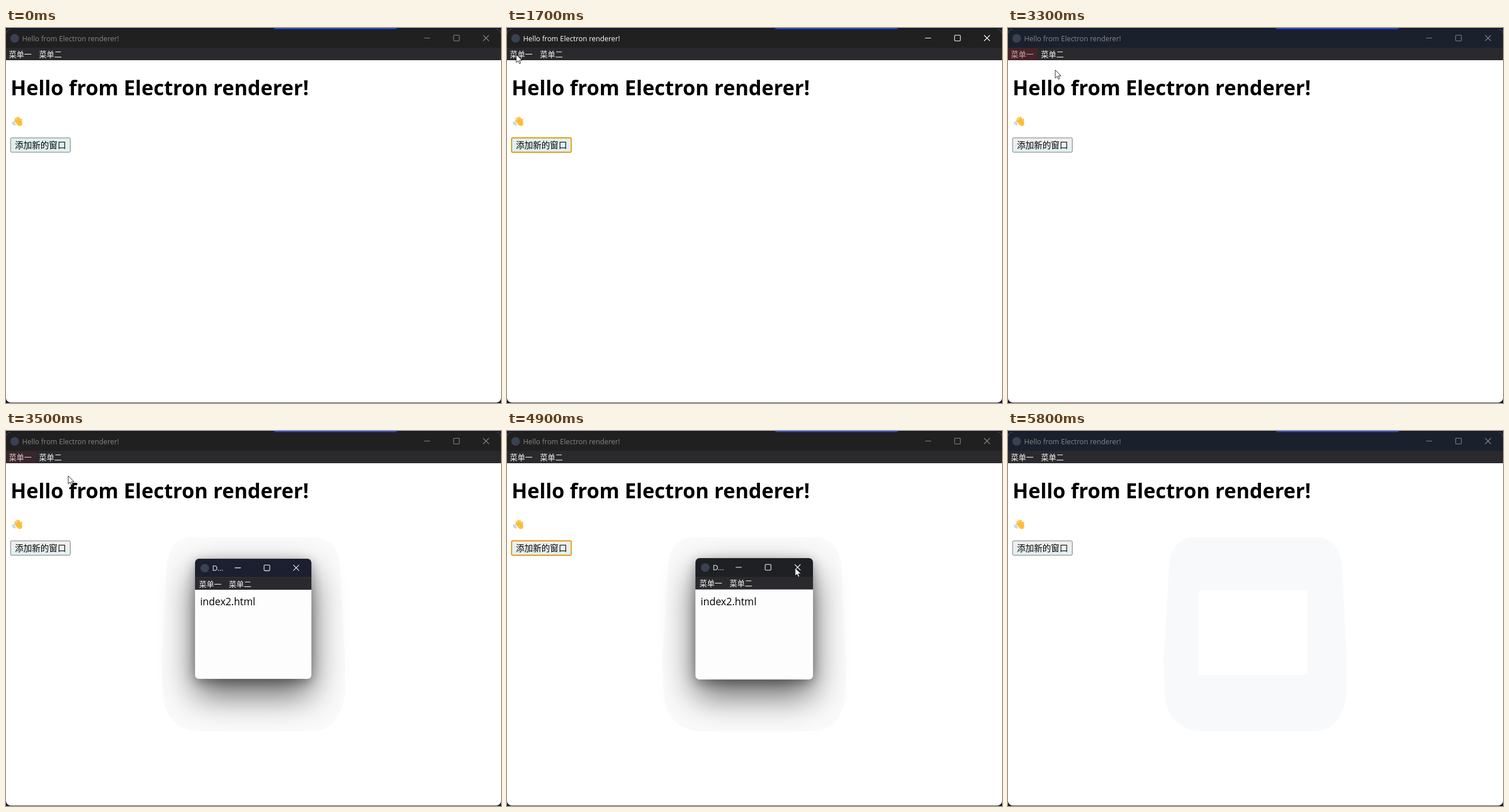
An HTML page that plays this animation: 859 px wide and 652 px high, repeating every 5.9 s.

```html
<!DOCTYPE html>
<html lang="zh-CN">
<head>
<meta charset="utf-8">
<title>Windows</title>
<style>
html, body { margin: 0; width: 100%; height: 100%; overflow: hidden; background: #0c1838; }
svg { display: block; width: 100vw; height: 100vh; }
text { font: 13.2px "Open Sans", "Noto Sans", "Noto Sans CJK SC", "Noto Sans CJK", sans-serif; white-space: pre; }
.bar { font-size: 12.35px; }
.heading { font-size: 35.5px; font-weight: 700; }
.button { font-size: 14.8px; }
.page { font-size: 17.5px; }
.light { fill: #f4f4f4; }
.controls { fill: none; stroke: currentColor; stroke-width: 1.1; }
</style>
</head>
<body>
<svg id="stage" viewBox="0 0 859 652"></svg>
<script>
const LOOP = 5900, STEP = 100;
const stage = document.getElementById('stage');

const label = (x, y, text, cls = 'light', more = '') =>
  `<text x="${x}" y="${y}" class="${cls}" ${more}>${text}</text>`;

const box = (x, y, w, h, fill, more = '') =>
  `<rect x="${x}" y="${y}" width="${w}" height="${h}" fill="${fill}" ${more}/>`;

const appIcon = (x, y) => `<circle cx="${x}" cy="${y}" r="7.5" fill="#3a4152"/>`;

// Minimize, maximize and close, with x at the middle of the first one
const controls = (x, y, gap = 51.25) => `<g class="controls">
  <path d="M${x - 5} ${y}h10.5"/>
  <rect x="${x + gap - 5}" y="${y - 5}" width="10" height="10" rx="1.5"/>
  <path d="M${x + 2 * gap - 5} ${y - 5}l10 10m0 -10l-10 10"/></g>`;

const menuTitles = (x, y) => label(x, y, '菜单一') + label(x + 52.3, y, '菜单二');

const wave = `<g fill="none" stroke="#fcc23c" stroke-linecap="round">
  <path stroke-width="2.6" d="M20.5 166L15 161.500M21 163.500L16 158M23 161.500L18.600 155.800M25 161L22 155.500"/>
  <ellipse cx="23" cy="165" rx="4.8" ry="6" fill="#fcc23c" stroke="none" transform="rotate(-40 23 165)"/>
  <path stroke-width="2.6" d="M26.200 165.500L26.600 158.800"/>
  <path stroke="#e59a28" stroke-width=".7" d="M16.800 160.300l3.600 3.600M18.800 158l3.400 3.800M24.800 163q-1.500 1.500 -.6 3.400"/>
  <path stroke="#9dbad3" stroke-width="1.3" d="M11.200 163.500q.2 4 4.400 5.200M13.400 163.500q.4 2.200 2.800 3.400"/></g>`;

const submenu = ['一', '二', '三', '四'].map((n, i) =>
  label(23.8, 81.5 + 26.4 * i, '子菜单' + n)).join('');

stage.innerHTML = `
<defs>
  <clipPath id="frame"><rect y="2" width="859" height="649.2" rx="8"/></clipPath>
  <clipPath id="childFrame"><rect x="327" y="221" width="204" height="211" rx="7"/></clipPath>
  <clipPath id="below"><path d="M0 56h859v596h-859z"/></clipPath>
  <filter id="wide" x="-1" y="-1" width="3" height="3"><feGaussianBlur stdDeviation="30"/></filter>
  <filter id="tight" x="-1" y="-1" width="3" height="3"><feGaussianBlur stdDeviation="10"/></filter>
  <linearGradient id="face" x2="0" y2="1">
    <stop offset=".3" stop-color="#efefef"/><stop offset="1" stop-color="#dff1f3"/>
  </linearGradient>
</defs>
${box(0, 0, 859, 652, '#0c1838')}
<path d="M467 0h213l-4 2h-212z" fill="#2148dc"/>
<g clip-path="url(#frame)">
  ${box(0, 0, 859, 652, '#fff')}
  ${box(0, 0, 859, 35, '#202020', 'id="titleBar"')}
  ${box(0, 34.5, 859, 21.5, '#2a2a2e')}
  ${appIcon(15, 18)}
  <g id="title">
    ${label(28, 22.8, 'Hello from Electron renderer!', 'bar', 'fill="currentColor"')}
    ${controls(730.5, 17.5)}
  </g>
  ${menuTitles(5, 50.8)}
  ${box(0, 35, 51, 21, 'rgba(125,22,34,.35)', 'id="menuGlow"')}
  ${label(8, 117, 'Hello from Electron renderer!', 'heading')}
  ${wave}
  ${box(8, 191, 103.5, 25, '#e0f0f0', 'id="button" rx="2"')}
  ${label(15.4, 209, '添加新的窗口', 'button')}
  <g id="halo">
    <path fill="currentColor" d="M318 185H540Q580 190 580 245L588 400V455Q580 522 530 522H330Q275 515 272 455L270 400L279 245Q279 190 318 185z"/>
    ${box(330, 277, 190, 147, '#fff', 'rx="5"')}
  </g>
</g>
<g id="menu">
  <g clip-path="url(#below)">${box(-10, 66, 169, 118, '#000', 'rx="8" opacity=".38" filter="url(#tight)"')}</g>
  <path d="M0 56h150q7.500 0 7.500 7.500v107q0 7.500 -7.500 7.500h-150z" fill="#2a2a2c"/>
  ${box(0, 63.3, 157.5, 26.4, '#414141', 'id="hover"')}
  ${submenu}
  ${label(128, 81.3, 'Ctrl+N', 'light', 'text-anchor="end"')}
</g>
<g id="child">
  ${box(327, 248, 204, 211, '#000', 'rx="8" opacity=".62" filter="url(#wide)"')}
  ${box(327, 226, 204, 211, '#000', 'rx="8" opacity=".32" filter="url(#tight)"')}
  <g clip-path="url(#childFrame)">
    ${box(327, 221, 204, 211, '#fdfdfd')}
    ${box(327, 221, 204, 33, '#1f2023', 'id="childBar"')}
    ${box(327, 253.5, 204, 22, '#2a2a2e')}
    ${box(479, 221, 52, 32.5, '#c42b1c', 'id="closeGlow"')}
    ${appIcon(344, 237.5)}
    ${label(357, 242, 'D...')}
    <g color="#fff">${controls(401.8, 237)}</g>
    ${menuTitles(334, 270)}
    ${label(336, 303, 'index2.html', 'page')}
  </g>
</g>
<path id="cursor" d="M0 0v14l3.300 -3l2.200 5l2.200 -1l-2.100 -4.800h4.400z" fill="#fff" stroke="#111" stroke-width=".9"/>`;

const el = Object.fromEntries([...stage.querySelectorAll('g[id], rect[id], path[id]')].map(e => [e.id, e]));

// Each leg starts at a time and visits one point per step, then rests
const legs = [
  [200, [[846, 102], [818, 123], [799, 132], [756, 148], [625, 171], [493, 166]]],
  [800, [[340, 140], [230, 104], [152, 71], [100, 55], [40, 52], [16, 46]]],
  [2100, [[24, 56], [48, 78], [70, 87], [80, 80], [82, 73]]],
  [3500, [[108, 78], [285, 170], [365, 285], [401, 344]]],
  [3900, [[441, 313], [480, 270], [497, 244], [500, 238]]],
  [5100, [[521, 228], [674, 159], [809, 84]]]
];

const clamp = v => Math.max(0, Math.min(1, v));
const during = (t, from, to) => t >= from && t < to;
const show = (e, opacity) => e.setAttribute('opacity', opacity);

function cursorAt(t) {
  const [start, points] = legs.filter(leg => leg[0] <= t).pop() || legs[0];
  return points[Math.min(points.length - 1, Math.max(0, (t - start) / STEP))];
}

function drawMain(t) {
  const active = during(t, 1600, 3300) || during(t, 5000, 5800);
  const focused = during(t, 1600, 3300) || during(t, 4900, 5800);
  const tinted = during(t, 1800, 3500) || t >= 5000;
  el.title.setAttribute('color', active ? '#fff' : '#868686');
  el.titleBar.setAttribute('fill', tinted ? '#1b202d' : '#202020');
  el.button.setAttribute('fill', t < 1800 ? '#e0f0f0' : 'url(#face)');
  el.button.setAttribute('stroke', focused ? '#e39b12' : '#767676');
  el.button.setAttribute('stroke-width', focused ? 2 : 1);
  show(el.menuGlow, t < 1800 ? 0 : clamp((3700 - t) / 400));
  show(el.menu, t < 3300 ? clamp((t - 1700) / 200) : 0);
}

function drawChild(t) {
  const settle = (1 - clamp((t - 3300) / 300)) ** 3;
  const leaving = clamp((t - 4900) / 200);
  const scale = 1 - 0.27 * settle - 0.1 * leaving;
  el.child.setAttribute('transform', `translate(429 326.5) scale(${scale}) translate(-429 -326.5)`);
  show(el.child, during(t, 3400, 5100) ? clamp(1.5 - 3 * settle) * (1 - leaving) : 0);
  el.childBar.setAttribute('fill', t < 3600 ? '#1b1f2f' : '#1f2023');
  show(el.closeGlow, t < 4900 ? clamp((t - 4000) / 200) : 0);
  show(el.halo, t < 3500 ? 0 : 1);
  el.halo.setAttribute('color', t < 5000 ? '#fafafa' : '#f8f9fb');
}

function drawCursor(t) {
  const [x, y] = cursorAt(t);
  el.cursor.setAttribute('transform', `translate(${x} ${y})`);
  show(el.cursor, during(t, 200, 5400) ? 1 : 0);
  show(el.hover, during(t, 2100, 3300) && y >= 63 ? 1 : 0);
}

const origin = performance.now();
function frame() {
  const t = Math.floor((performance.now() - origin) % LOOP / STEP) * STEP;
  drawMain(t);
  drawChild(t);
  drawCursor(t);
  requestAnimationFrame(frame);
}
frame();
</script>
</body>
</html>
```
